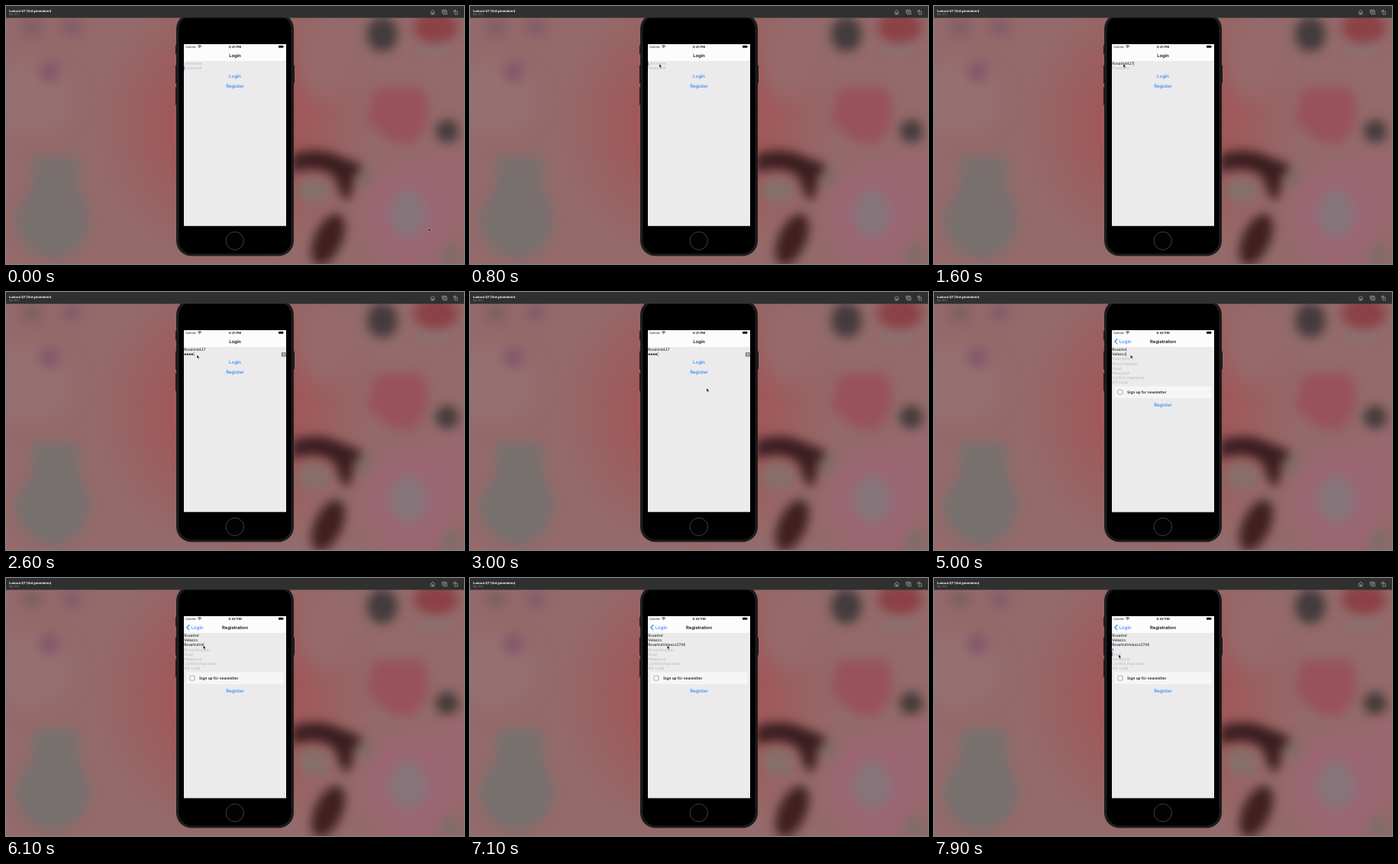
Write an HTML page that moves like this. It is 600 px wide and 338 px high and loops after 8000 ms.

```html
<!DOCTYPE html>
<html lang="en">
<head>
<meta charset="utf-8">
<title>Registration form</title>
<style>
  html, body { margin: 0; width: 100%; height: 100%; overflow: hidden; background: #936a6a; }
  svg { display: block; width: 100vw; height: 100vh; }
  text { font-family: Inter, Roboto, sans-serif; text-rendering: geometricPrecision; white-space: pre; }
  .field { font-size: 4.85px; }
  .nav { font-size: 5.85px; font-weight: 600; text-anchor: middle; fill: #111; }
  .link { font-size: 6.07px; fill: #0f78f5; }
  .mid { text-anchor: middle; }
  .status { font-size: 4.2px; fill: #111; }
  .icon { fill: none; stroke: #b8b8b8; stroke-width: .6; stroke-linejoin: round; }
</style>
</head>
<body>
<svg viewBox="0 0 600 338" preserveAspectRatio="none">
  <defs>
    <radialGradient id="glow" gradientUnits="userSpaceOnUse" cx="300" cy="155" r="185">
      <stop offset="0" stop-color="#a85052"/>
      <stop offset=".45" stop-color="#a05859"/>
      <stop offset="1" stop-color="#a05859" stop-opacity="0"/>
    </radialGradient>
    <filter id="soft" x="-60%" y="-60%" width="220%" height="220%" color-interpolation-filters="sRGB"><feGaussianBlur stdDeviation="7"/></filter>
    <filter id="wide" x="-60%" y="-60%" width="220%" height="220%" color-interpolation-filters="sRGB"><feGaussianBlur stdDeviation="13"/></filter>
    <clipPath id="screen"><rect x="233" y="50" width="134" height="238.3"/></clipPath>
  </defs>

  <!-- blurred wallpaper -->
  <rect width="600" height="338" fill="#946a6a"/>
  <rect width="600" height="338" fill="url(#glow)"/>
  <g filter="url(#wide)">
    <ellipse cx="530" cy="275" rx="60" ry="66" fill="#9c6675"/>
    <ellipse cx="585" cy="235" rx="30" ry="50" fill="#9b6773"/>
    <ellipse cx="30" cy="120" rx="60" ry="50" fill="#967071"/>
    <ellipse cx="420" cy="70" rx="35" ry="50" fill="#966a6b"/>
  </g>
  <g filter="url(#soft)">
    <ellipse cx="57" cy="86" rx="14" ry="14" fill="#84596a"/>
    <ellipse cx="34" cy="28" rx="16" ry="12" fill="#7f6066"/>
    <ellipse cx="86" cy="28" rx="14" ry="11" fill="#835c6a"/>
    <path d="M34 198H95L95 240Q112 265 108 290Q98 328 62 332Q26 328 13 292Q10 265 34 240Z" fill="#77706e"/>
    <path d="M374 195Q410 182 440 198L466 208Q468 220 454 224Q456 246 446 256Q436 246 432 226Q414 206 374 218Z" fill="#3a1d1f"/>
    <ellipse cx="404" cy="242" rx="21" ry="18" fill="#857069"/>
    <ellipse cx="422" cy="306" rx="18" ry="36" transform="rotate(24 422 306)" fill="#3f1f20"/>
    <ellipse cx="468" cy="225" rx="10" ry="12" fill="#7f6c67"/>
    <ellipse cx="527" cy="272" rx="25" ry="32" fill="#86757a"/>
    <ellipse cx="583" cy="326" rx="14" ry="14" fill="#7f6c69"/>
    <path d="M482 108L544 106Q560 130 548 162L532 182L500 176L472 150Z" fill="#98525c"/>
    <ellipse cx="493" cy="37" rx="20" ry="23" fill="#443b3c"/>
    <ellipse cx="563" cy="28" rx="29" ry="20" fill="#8c4146"/>
    <ellipse cx="562" cy="58" rx="22" ry="8" fill="#8c7070"/>
    <ellipse cx="578" cy="164" rx="15" ry="15" fill="#443a3a"/>
  </g>

  <!-- phone -->
  <g fill="#17191b">
    <rect x="222" y="51" width="4" height="12.5" rx="1"/>
    <rect x="222" y="77.5" width="4" height="24" rx="1"/>
    <rect x="222" y="106" width="4" height="24" rx="1"/>
    <rect x="374" y="77.5" width="4" height="24" rx="1"/>
  </g>
  <rect x="223" y="10" width="154" height="317.6" rx="20" fill="#1a1c1d"/>
  <rect x="226.5" y="13" width="147" height="311.5" rx="17"/>
  <circle cx="299.8" cy="307.6" r="11.7" fill="#020202" stroke="#5c5c5e" stroke-width=".7"/>

  <!-- window bar -->
  <rect width="600" height="15.5" fill="#303030"/>
  <text x="4" y="7.5" font-size="4.1" font-weight="700" fill="#f4f4f4">Lumora QT (3rd generation)</text>
  <text x="4" y="12" font-size="3.3" fill="#a8a8a8">Sys 17.4</text>
  <path class="icon" d="M556 8L559 5.2L562 8M556.9 7.4V10.8H561.1V7.4M558.4 10.8V8.8H559.6V10.8"/>
  <path class="icon" d="M571.4 9.2V5.2H576.4V6.4M572.8 6.6H577.6V10.8H572.8Z"/>
  <circle class="icon" cx="575.2" cy="8.7" r=".8"/>
  <path class="icon" d="M588 7.2H591.4V11H588ZM586.6 8.2V5.8H589.4M588.3 4.6L589.5 5.8L588.3 7"/>

  <g clip-path="url(#screen)">
    <rect x="233" y="49" width="134" height="240" fill="#ebebec"/>

    <g id="login">
      <text class="link mid" x="300" y="93.7">Login</text>
      <text class="link mid" x="300" y="107.1">Register</text>
      <g id="caps">
        <rect x="360.8" y="78.9" width="5.8" height="5.8" rx="1" fill="#858588"/>
        <path d="M363.7 80L365.1 81.6H364.3V83.5H363.1V81.6H362.3Z" fill="#ddd"/>
      </g>
    </g>

    <g id="register">
      <rect x="233" y="72" width="134" height="217" fill="#ebebec"/>
      <rect x="236.3" y="123.4" width="127.2" height="15.6" rx="1" fill="#f6f6f6"/>
      <rect x="241.1" y="128.1" width="5.9" height="6" rx="1" fill="#fafafa" stroke="#777" stroke-width=".6"/>
      <text x="253" y="133" font-size="4.85" font-weight="600" fill="#1c1c1c">Sign up for newsletter</text>
      <text class="link mid" x="300" y="150.3">Register</text>
    </g>

    <rect x="233" y="49" width="134" height="23" fill="#fcfcfc"/>
    <text class="status" x="235.3" y="54.7">Carrier</text>
    <g fill="none" stroke="#111" stroke-width=".75">
      <path d="M251.2 52.5Q253.6 50.4 256 52.5M252.1 53.5Q253.6 52.2 255.1 53.5"/>
      <circle cx="253.6" cy="54.4" r=".3"/>
    </g>
    <text id="clock" class="status mid" x="300" y="54.7" font-weight="600"></text>
    <rect x="357" y="51.7" width="6.3" height="3.1" rx=".8" fill="#111"/>
    <rect x="363.6" y="52.7" width=".6" height="1.1" fill="#555"/>
    <text id="loginNav" class="nav" x="300" y="66.9">Login</text>
    <g id="registerNav">
      <path d="M240 61.6L236.8 64.8L240 68" fill="none" stroke="#0f78f5" stroke-width="1.05" stroke-linecap="round" stroke-linejoin="round"/>
      <text class="link" x="242.7" y="66.9">Login</text>
      <text class="nav" x="300" y="66.9">Registration</text>
    </g>
  </g>

  <path id="mouse" d="M0 0V4.4L1.1 3.5L1.9 5.2L2.7 4.8L1.9 3.2H3.3Z" fill="#050505" stroke="#e8e8e8" stroke-width=".35"/>
</svg>
<script>
const LOOP = 8000;
const PUSH = { at: 3270, time: 200 };
const CLOCK_TICK = 4300;
const BLINK = 250;
const $ = id => document.getElementById(id);

// page, row, placeholder, value, first key, last key
const fields = [
  ['login', 0, 'Username', 'Rosalind427', 900, 1500],
  ['login', 1, 'Password', '****', 2100, 2500],
  ['register', 0, 'First Name', 'Rosalind', 3900, 4300],
  ['register', 1, 'Last Name', 'Velasco', 4520, 4900],
  ['register', 2, 'Username', 'RosalindVelasco2746', 5400, 6700],
  ['register', 3, 'Phone Number', '1', 7500, 7500],
  ['register', 4, 'Email'],
  ['register', 5, 'Password'],
  ['register', 6, 'Confirm Password'],
  ['register', 7, 'ZIP Code']
].map(([page, row, hint, value = '', from = Infinity, to = Infinity]) =>
  ({ page, y: 77.3 + row * 6.07, hint, value, from, to, secret: value[0] === '*' }));

// time, index of the focused field
const focusSteps = [[0, 1], [800, 0], [1750, 1], [PUSH.at, -1], [3800, 2], [4420, 3], [5250, 4], [7300, 5], [7700, 6]];

// time, tip x, tip y
const mousePath = [
  [0, 553.5, 291], [150, 553.5, 291], [700, 248, 76], [1620, 248, 76], [1740, 248, 81], [2550, 248, 81],
  [3000, 310, 126], [3200, 302, 104], [3290, 302, 104], [3600, 263.5, 87.5], [3780, 257, 75],
  [4330, 257, 75], [4420, 257.5, 82.5], [5100, 257.5, 82.5], [5250, 258.5, 88.5],
  [7150, 258.5, 88.5], [7290, 243, 94], [7580, 243, 94], [7700, 242, 100.5], [8000, 242, 100.5]
];

function make(tag, attrs, parent) {
  const el = document.createElementNS('http://www.w3.org/2000/svg', tag);
  for (const key in attrs) el.setAttribute(key, attrs[key]);
  return parent.appendChild(el);
}

for (const f of fields) {
  const page = $(f.page);
  f.text = make('text', { class: 'field', x: 233.2, y: f.y }, page);
  if (f.secret) f.dots = [...f.value].map((_, i) =>
    make('circle', { cx: 234.8 + i * 3, cy: f.y - 1.7, r: 1.15, fill: '#111' }, page));
  f.caret = make('rect', { y: f.y - 4.6, width: .75, height: 5.6, fill: '#2f7bea' }, page);
}

const clamp = v => Math.min(1, Math.max(0, v));
const ease = v => v * v * (3 - 2 * v);
const lastStep = (steps, t) => steps.filter(s => s[0] <= t).pop();
const shift = (el, x, y = 0) => el.setAttribute('transform', `translate(${x} ${y})`);
const show = (el, on) => { el.style.display = on ? '' : 'none'; };

function typedCount({ value, from, to }, t) {
  if (t < from) return 0;
  if (t >= to) return value.length;
  return 1 + Math.floor((value.length - 1) * (t - from) / (to - from));
}

function drawField(f, t, focused, focusTime) {
  const n = typedCount(f, t);
  f.text.textContent = n ? (f.secret ? '' : f.value.slice(0, n)) : f.hint;
  f.text.setAttribute('fill', n ? '#111' : '#b6b6b9');
  if (f.dots) f.dots.forEach((dot, i) => show(dot, i < n));

  const lastKey = t >= f.to ? f.to : t >= f.from ? t : focusTime;
  const idle = t - Math.max(lastKey, focusTime);
  show(f.caret, focused && idle % (2 * BLINK) < BLINK);
  if (focused) {
    const width = !n ? 0 : f.secret ? n * 3 + .5 : f.text.getComputedTextLength();
    f.caret.setAttribute('x', 233.2 + width);
  }
}

function drawMouse(t) {
  const next = mousePath.findIndex(p => p[0] > t);
  const a = mousePath[next - 1], b = mousePath[next];
  const k = ease((t - a[0]) / (b[0] - a[0]));
  shift($('mouse'), a[1] + (b[1] - a[1]) * k, a[2] + (b[2] - a[2]) * k);
}

function draw(t) {
  const [focusTime, active] = lastStep(focusSteps, t);
  fields.forEach((f, i) => drawField(f, t, i === active, focusTime));
  show($('caps'), active === 1 && t >= 1750);

  const p = ease(clamp((t - PUSH.at) / PUSH.time));
  shift($('login'), -40 * p);
  shift($('register'), 134 * (1 - p));
  shift($('loginNav'), -50 * p);
  shift($('registerNav'), 50 * (1 - p));
  $('loginNav').style.opacity = 1 - p;
  $('registerNav').style.opacity = p;
  $('clock').textContent = t < CLOCK_TICK ? '6:41 PM' : '6:42 PM';
  drawMouse(t);
}

const start = performance.now();
function tick() {
  draw((performance.now() - start) % LOOP);
  requestAnimationFrame(tick);
}
tick();
</script>
</body>
</html>
```
